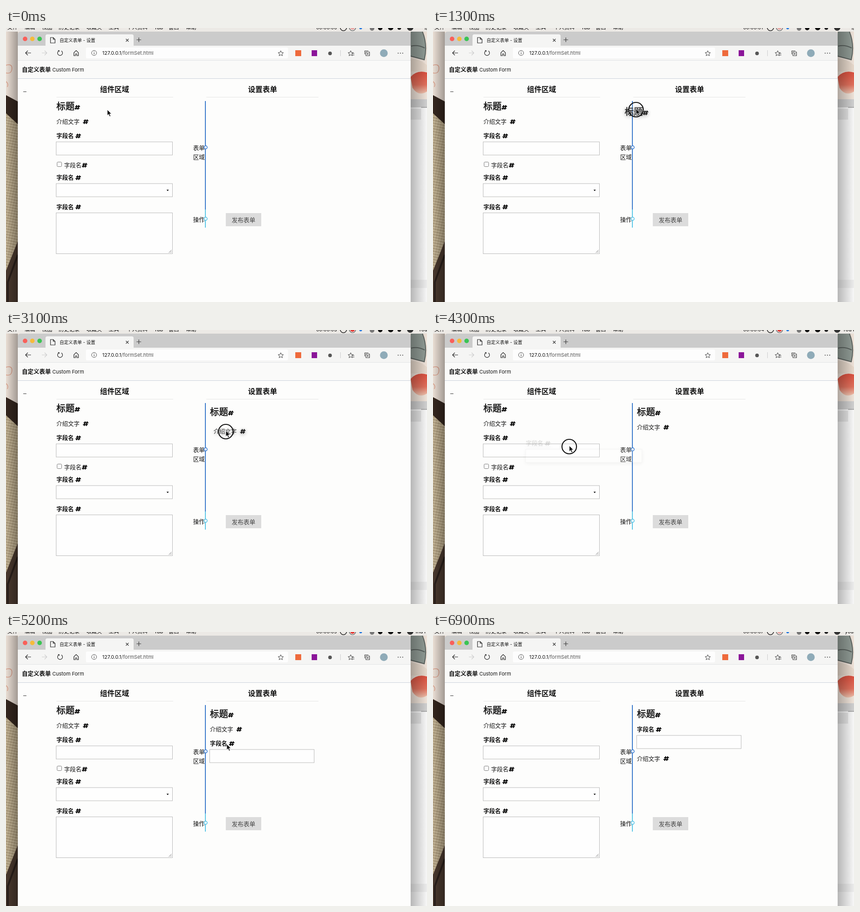
Recreate the animation shown at these times as an HTML page. Size 927 by 604 pixels, loop 7000 ms.

```html
<!DOCTYPE html>
<html lang="zh">
<head>
<meta charset="utf-8">
<title>自定义表单</title>
<style>
html, body { margin: 0; width: 100%; height: 100%; overflow: hidden; }
svg { display: block; font-family: Inter, "Noto Sans CJK SC", "Noto Sans CJK", sans-serif; }
text { white-space: pre; }
.ghost { filter: drop-shadow(0 2px 4px rgba(0,0,0,.4)); }
</style>
</head>
<body>
<svg width="927" height="604" viewBox="0 0 927 604">
  <defs>
    <linearGradient id="shadeL"><stop stop-opacity=".02"/><stop offset="1" stop-opacity=".32"/></linearGradient>
    <linearGradient id="shadeR"><stop stop-opacity=".26"/><stop offset="1" stop-opacity="0"/></linearGradient>
    <linearGradient id="petal" x2="0" y2="1"><stop stop-color="#d9503f"/><stop offset=".6" stop-color="#e0705c"/><stop offset="1" stop-color="#eec2ae"/></linearGradient>
    <pattern id="burlap" width="6" height="6" patternUnits="userSpaceOnUse" patternTransform="rotate(12)">
      <path fill="#c3b292" d="M0 0h6v6H0z"/>
      <path stroke="#a08e70" d="M0 1h6M1 0v6"/><path stroke="#d6c8ab" d="M0 4h6"/>
    </pattern>
    <clipPath id="corner"><path d="M901 0h26v8h-26z"/></clipPath>
  </defs>
  <g id="still"></g>
  <g id="live"></g>
</svg>
<script>
const still = document.getElementById('still'), live = document.getElementById('live');

// y is the vertical middle of the glyphs
const text = (x, y, s, size = 12.75, weight = 400, fill = '#111') =>
  `<text x="${x}" y="${y + size * .37}" font-size="${size}" font-weight="${weight}" fill="${fill}">${s}</text>`;
const rect = (x, y, w, h, fill, more = '') =>
  `<rect x="${x}" y="${y}" width="${w}" height="${h}" fill="${fill}" ${more}/>`;
const circle = (x, y, r, fill, more = '') => `<circle cx="${x}" cy="${y}" r="${r}" fill="${fill}" ${more}/>`;
const line = (d, stroke = '#333', w = 1.2, more = '') =>
  `<path d="${d}" fill="none" stroke="${stroke}" stroke-width="${w}" ${more}/>`;
const at = (x, y, s, more = '') => `<g transform="translate(${x} ${y})" ${more}>${s}</g>`;
const box = (x, y, w, h) => rect(x, y, w, h, '#fefefe', 'stroke="#b9b9b9"');

const hash = (x, y) => at(x, y, line('M-1-5L-3.4 5M3.4-5L1 5M-4.6-2H6M-6 2H4.6', '#000', 2.2));
const title = () => `<g stroke="#111" stroke-width=".5">${text(0, 0, '标题', 20, 500)}</g>` + hash(46, 2);
const intro = () => text(0, 0, '介绍文字') + hash(64.5, 0);
const label = () => text(0, 0, '字段名', 12.75, 700) + hash(48, .5);
const field = (w, h = 29) => label() + box(-.5, 13.5, w, h);

const star = (x, y) => at(x, y, line('M0-6L1.7-2 6-1.7 2.7 1 3.7 5.2 0 3-3.7 5.2-2.7 1-6-1.7-1.7-2z', '#444', 1));

function desktop() {
  const menu = [[3, '文件'], [41, '编辑'], [79, '视图'], [116, '历史记录'], [177, '收藏夹'], [226, '工具'],
    [266, '个人资料'], [326, 'Tab'], [358, '窗口'], [396, '帮助']];
  return rect(0, 0, 927, 604, '#eee2d8')
    + line('M0 82Q14 78 13 90T0 99M0 118q6 4 3 12', '#dda08a', 1.5)
    + '<path fill="url(#burlap)" d="M0 185h26v419H0z"/>'
    + '<path fill="#35271f" d="M0 148L26 162V212L0 188z"/>'
    + '<path fill="#4b3a2f" d="M26 470V604H0V535z"/>'
    + line('M26 500L4 560V604', '#2b201b', 4)
    + rect(0, 8, 26, 596, 'url(#shadeL)')
    + '<path fill="#8f9a94" d="M891 8h26q12 30 4 62l-30-8z"/>'
    + line('M892 40q14-4 30 4M917 8q12 30 4 62l-30-8', '#59605d', 2)
    + '<path fill="#e6d8cb" d="M891 68q20 0 36 14v14h-36z"/>'
    + '<path fill="url(#petal)" d="M891 108Q904 92 927 98V140Q908 152 895 132z"/>'
    + rect(891, 157, 36, 18, '#cfcfcf') + rect(891, 175, 36, 429, '#f7f7f7')
    + rect(891, 178, 23, 24, '#e4e4e4') + rect(891, 555, 36, 18, '#ececec')
    + line('M914 175H927', '#777', 1)
    + rect(891, 8, 36, 596, 'url(#shadeR)')
    + rect(0, 0, 927, 8, '#ece9e5')
    + menu.map(([x, s]) => text(x, -1, s, 11.5)).join('')
    + circle(743, -1, 7, 'none', 'stroke="#222" stroke-width="1.5"')
    + circle(781, 0, 3, '#2b7de0') + circle(806, 1, 5, '#777') + circle(824, 0, 5, '#111')
    + circle(847, -1, 6, '#111') + circle(866, 0, 4, '#222')
    + circle(890, -1, 7, '#333');
}

function browser() {
  const lights = ['#f9605a', '#f5bb3b', '#3bc454'];
  return '<path fill="#cbcbcb" d="M26 604V14q0-6 6-6H885q6 0 6 6V604z"/>'
    + lights.map((c, i) => circle(42 + i * 16, 24, 5, c)).join('')
    + '<path fill="#f5f5f4" d="M26 39H87V18q0-4 4-4H277q4 0 4 4V39H891V71H26z"/>'
    + line('M98 21h6l4 4v8H98zM104 21v4h4', '#222')
    + text(118, 27, '自定义表单 - 设置', 9.8)
    + line('M264 24l6 6M270 24l-6 6M287.500 26h10M292.500 21v10', '#333', 1.1)
    + rect(176, 43, 445, 24, '#fdfdfd', 'rx="3"')
    + line('M55 55H43M48 50l-5 5 5 5', '#222') + line('M79 55H90M85 50l5 5-5 5', '#ccc')
    + line('M122 50.500a5.500 5.500 0 1 1-6 0M114.500 49.500h2.500v3', '#222')
    + line('M149.500 54.500l5-5 5 5V61H156V57H153V61H149.500z', '#222')
    + circle(194, 55, 5.5, 'none', 'stroke="#555"') + line('M194 54v4M194 51.500v1.300', '#555')
    + text(212, 55, '127.0.0.1<tspan fill="#555">/formSet.html</tspan>', 11)
    + star(605, 56) + rect(637, 49, 13, 13, '#ee6a3c') + rect(673, 49, 12, 13, '#8b1599')
    + circle(713.5, 56, 4, '#555')
    + line('M736.500 49V62', '#ccc', 1) + star(759, 56)
    + line('M761 56h6M763 59.500h4', '#444', 1)
    + line('M790 58V50.500h8M792.500 53h8v8h-8zM796.500 55v4M794.500 57h4', '#333', 1.1)
    + circle(832, 55.5, 8.5, '#8fabb8')
    + [863.5, 868.5, 873.5].map(x => circle(x, 55.5, 1, '#333')).join('');
}

function page() {
  return rect(26, 71, 865, 40, '#fafaf9') + rect(26, 111, 865, 493, '#fdfdfc')
    + line('M26 71.500H891', '#e2e4e6', 1) + line('M26 111.500H891', '#cbd0da', 1)
    + text(35, 91.5, '自定义表单', 12.75, 700) + text(102, 92, 'Custom Form', 11)
    + line('M38 140.500h7', '#333', 1)
    + text(207, 135, '组件区域', 16, 700) + text(533, 135, '设置表单', 16, 700)
    + line('M111 152.500H368M441 152.500H688', '#e5e5e5', 1)
    + at(111, 173, title()) + at(111, 206.5, intro()) + at(111, 237.5, field(256))
    + rect(112.5, 295.5, 10, 10, '#fff', 'rx="2" stroke="#777"')
    + text(128, 302, '字段名') + hash(173, 302.5)
    + at(111, 329.5, field(256)) + '<path d="M353.500 356.500h5l-2.500 3z"/>'
    + at(111, 394, field(256, 90)) + line('M358.500 495.500l6-6M362 495.500l2.500-2.500', '#777', 1)
    + text(412, 264.5, '表单') + text(412, 284, '区域') + text(412, 422, '操作')
    + rect(484, 408, 78, 29, '#dcdcdc') + text(497, 423, '发布表单', 13, 400, '#444');
}

const axis = line('M439 161V400', '#3a7acb', 2) + line('M439 400V440', '#5cc6e6', 2)
  + circle(439.5, 263, 3.5, '#fff', 'stroke="#2c74d0" stroke-width="1.5"')
  + circle(439.5, 420.5, 3.5, '#fff', 'stroke="#4cc0e6" stroke-width="1.5"');

const arrow = '<path d="M0-2V11l3-2.800 2.200 5 2.300-1-2.200-4.900H9.300z" fill="#111" stroke="#fff" stroke-width=".9"/>';

// pointer: time, x, y
const path = [[0, 223, 182], [500, 136, 168], [600, 136, 168], [1300, 447, 180], [1550, 474, 176],
  [1700, 474, 176], [2300, 138, 207], [2400, 138, 207], [3000, 480, 223], [3100, 484, 224], [3300, 475, 215],
  [3400, 475, 215], [4050, 206.5, 245], [4150, 206.5, 245], [4300, 300, 257], [4850, 486, 251],
  [5200, 486, 249], [5400, 477, 247], [5500, 477, 247], [5900, 490, 200], [6000, 490, 198],
  [6350, 490, 198], [6500, 492, 215], [6900, 510, 625], [7000, 510, 625]];

// press and release times, where the part lies at the start
const drags = [
  { from: 550, to: 1600, x: 111, y: 173, part: title },
  { from: 2350, to: 3300, x: 111, y: 206.5, part: intro },
  { from: 4150, to: 4900, x: 111, y: 237.5, part: () => field(256) },
  { from: 5450, to: 6400, x: 449, y: 245.5, part: () => field(230) },
];

function pointer(t) {
  const i = path.findIndex(p => p[0] > t);
  const [t0, x0, y0] = path[i - 1], [t1, x1, y1] = path[i];
  const k = (t - t0) / (t1 - t0);
  return [x0 + (x1 - x0) * k, y0 + (y1 - y0) * k];
}

function ticker(t) {
  const [x, s] = t < 1700 ? [921, '您'] : t < 3500 ? [908, 'You'] : t < 4800 ? [902, 'You a']
    : t < 5600 ? [902, 'ind I'] : [907, 'you'];
  return `<g clip-path="url(#corner)">${text(x, -1, s, 11)}</g>`;
}

function form(t) {
  const marked = t >= 5800 && t < 6400, moved = t >= 6400;
  let s = '';
  if (t >= 1600) s += at(449, 181, title());
  if (t >= 3300) s += at(449, moved ? 279 : marked ? 215.5 : 214.5, intro());
  if (t >= 4900) s += at(449, moved ? 214.5 : marked ? 246.5 : 245.5, field(230));
  if (marked) s += line('M449 205H679', '#4a48c4', 1.4);
  return s;
}

function scene(t) {
  const [x, y] = pointer(t);
  const drag = drags.find(d => t >= d.from && t < d.to);
  let s = text(683, -.5, '00:00:0' + Math.floor((t + 150) / 1000), 10.5) + ticker(t)
    + circle(763, -1, 7, '#eee', 'stroke="#444" stroke-width="1.2"')
    + circle(763, -1, 5, t >= 1700 && t < 5600 ? '#e23b35' : '#e9aaa6')
    + form(t) + axis;
  if (drag) {
    const [px, py] = pointer(drag.from);
    // the dragged copy fades in slowly, then quickly
    const alpha = .9 * Math.min(1, (t - drag.from) / 500) ** 1.7;
    s += at(drag.x + x - px, drag.y + y - py, drag.part(), `class="ghost" opacity="${alpha}"`)
      + circle(x, y, 16, 'rgba(255,255,255,.1)', 'stroke="#111" stroke-width="2.2"');
  }
  return s + at(x, y, arrow);
}

still.innerHTML = desktop() + browser() + page();
const start = performance.now();
let shown = -1;
function tick() {
  const t = Math.floor((performance.now() - start) % 7000 / 100) * 100;
  if (t !== shown) live.innerHTML = scene(shown = t);
  requestAnimationFrame(tick);
}
tick();
</script>
</body>
</html>
```
